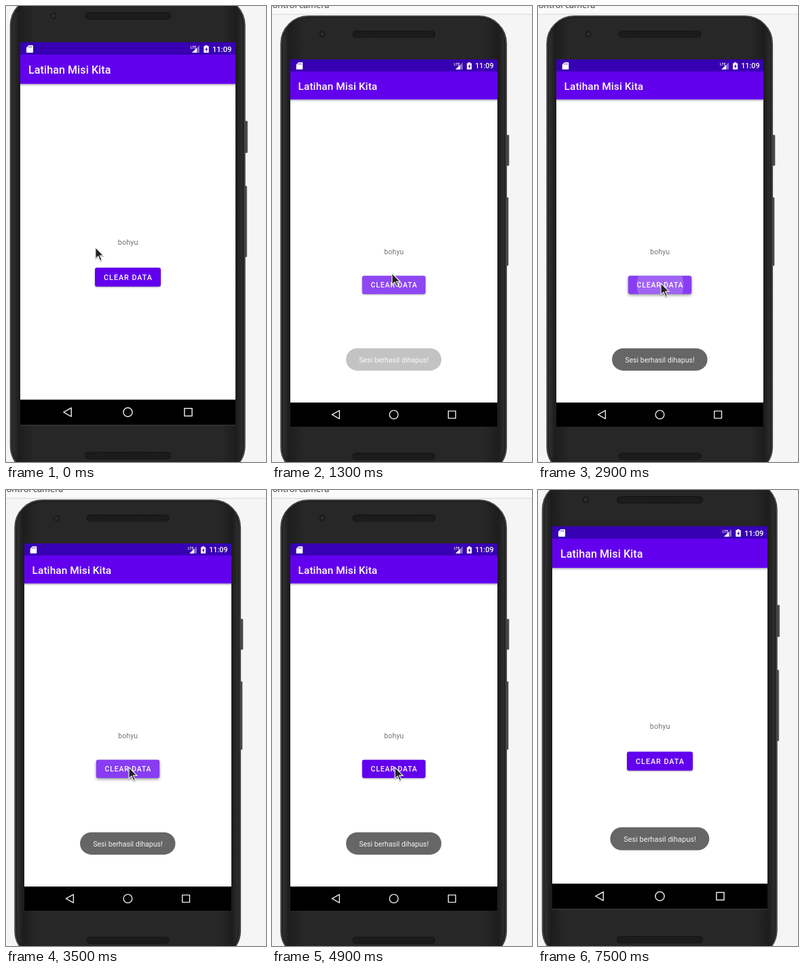
Write an HTML page that moves like this. It is 383 px wide and 674 px high and loops after 7.7 s.

```html
<!DOCTYPE html>
<html lang="id">
<head>
<meta charset="utf-8">
<title>Clear data</title>
<style>
  html, body { margin: 0; width: 100%; height: 100%; overflow: hidden; background: #f5f5f5; }
  svg { display: block; width: 383px; height: 674px; }
  text { font-family: Roboto, "Noto Sans", sans-serif; fill: #fff; }
  .medium { font-weight: 500; }
</style>
</head>
<body>
<svg viewBox="0 0 383 674">
  <defs>
    <linearGradient id="body">
      <stop offset="0" stop-color="#383838"/>
      <stop offset=".035" stop-color="#1d1d1d"/>
      <stop offset=".1" stop-color="#272727"/>
      <stop offset=".9" stop-color="#272727"/>
      <stop offset=".965" stop-color="#1d1d1d"/>
      <stop offset="1" stop-color="#343434"/>
    </linearGradient>
    <linearGradient id="barShadow" x2="0" y2="1">
      <stop offset="0" stop-color="#000" stop-opacity=".28"/>
      <stop offset="1" stop-color="#000" stop-opacity="0"/>
    </linearGradient>
    <clipPath id="buttonClip"><rect x="131" y="386.7" width="97" height="28" rx="3"/></clipPath>
    <g id="speaker">
      <rect x="116" y="-5.5" width="127" height="11" rx="5.5" fill="#161616"/>
      <g stroke="#353535" stroke-width="1.4" stroke-linecap="round" stroke-dasharray="0 3">
        <path d="M121 -2.8H240"/><path d="M119.5 0H241"/><path d="M121 2.8H240"/>
      </g>
    </g>
  </defs>

  <g id="view">
    <rect x="-20" y="-60" width="440" height="44" fill="#fafafa"/>
    <path d="M-20 -16H420" stroke="#d6d6d6"/>
    <text x="80.5" y="-25.6" font-size="13.3" text-anchor="end" style="fill:#333;font-family:'Open Sans',sans-serif">Control camera</text>

    <g fill="#484848" stroke="#666" stroke-width=".5">
      <rect x="350" y="170" width="5.8" height="47" rx="1"/>
      <rect x="350" y="266" width="4.8" height="105" rx="1"/>
    </g>
    <rect x="6.6" y="-13.2" width="345.2" height="705.4" rx="42" fill="url(#body)" stroke="#454545" stroke-width="1.8"/>
    <rect x="9" y="-10.8" width="340.4" height="700.6" rx="39.6" fill="none" stroke="#191919"/>
    <circle cx="70" cy="14.5" r="5" fill="#1c1c1c"/>
    <circle cx="70" cy="14.5" r="2.4" fill="#303030"/>
    <use href="#speaker" y="14.5"/>
    <use href="#speaker" y="664.5"/>

    <rect x="21" y="72" width="317" height="547.2" fill="#fff"/>
    <rect x="21" y="115.2" width="317" height="3.8" fill="url(#barShadow)"/>
    <rect x="21" y="53.5" width="317" height="19" fill="#3700b3"/>
    <rect x="21" y="72" width="317" height="43.2" fill="#6200ee"/>

    <path d="M33.5 58H39q1 0 1 1v9q0 1-1 1h-8q-1 0-1-1v-6.5z" fill="#fff"/>
    <path d="M33.8 59.5v2M35.7 59.5v2M37.6 59.5v2" stroke="#3700b3" stroke-width=".8"/>
    <text class="medium" x="271.5" y="63" font-size="5.6">LTE</text>
    <path d="M285 58V69H274z" fill="#fff" opacity=".4"/>
    <path d="M281 62V69H274z" fill="#fff"/>
    <path d="M293.5 58h3v1.2h2.2V69h-7.4V59.2h2.2z" fill="#fff"/>
    <path d="M295.7 60.5l-2.4 4.2h1.5v3l2.4-4.2h-1.5z" fill="#3700b3"/>
    <text class="medium" x="304" y="67.6" font-size="11.2">11:09</text>
    <text class="medium" x="33" y="100.3" font-size="16" letter-spacing=".1">Latihan Misi Kita</text>

    <text x="179.7" y="353.2" font-size="10.8" letter-spacing=".15" text-anchor="middle" style="fill:#757575">bohyu</text>

    <rect id="button" x="131" y="386.7" width="97" height="28" rx="3" fill="#6200ee"/>
    <g id="ripples" clip-path="url(#buttonClip)" fill="#fff"></g>
    <text class="medium" x="180" y="405" font-size="10.8" letter-spacing=".96" text-anchor="middle">CLEAR DATA</text>

    <g id="toast">
      <rect x="106.3" y="498.4" width="146" height="34.2" rx="17.1" fill="#666"/>
      <text x="179.5" y="519.8" font-size="11" text-anchor="middle" style="fill:#f2f2f2">Sesi berhasil dihapus!</text>
    </g>

    <rect x="21" y="581.8" width="317" height="37.4" fill="#000"/>
    <g fill="none" stroke="#e4e4e4" stroke-width="1.5" stroke-linejoin="round">
      <path d="M84.8 600.4L96.2 594V606.8z"/>
      <circle cx="179.5" cy="600.4" r="6.6"/>
      <rect x="262.9" y="594.8" width="11.2" height="11.2"/>
    </g>
  </g>

  <path id="cursor" d="M0 0V16.8L4 13.2L6.8 19.7L9.4 18.6L6.7 12.3H12z" fill="#222" stroke="#fff" stroke-width="1.1"
    style="filter:drop-shadow(.5px 1px .7px rgba(0,0,0,.35))"/>
</svg>

<script>
const LOOP = 7700, STEP = 100;
const ZOOM_OUT = 1100, ZOOM_IN = 7500, CURSOR_GONE = 6500;

// Ripples: start, end, radius growth per 100 ms, strength of the button tint
const ripples = [
  [1100, 1480, 31, .24],
  [1900, 2400, 23, .2],
  [2000, 2400, 16, 0],
  [2700, 3400, 17.5, .24],
  [3500, 4200, 17.5, .24],
  [4300, 4900, 17.5, .24]
].map(([from, end, grow, tint]) => ({ from, end, grow, tint }));

// Cursor stops: time, x, y
const stops = [
  [300, 131.8, 356.8], [900, 176.8, 395], [1400, 176.8, 395],
  [1800, 181, 409.8], [6000, 181, 409.8], [6400, 24.5, 1]
];

const $ = id => document.getElementById(id);
const clamp = v => Math.max(0, Math.min(1, v));
const set = (el, attrs) => {
  for (const name in attrs) el.setAttribute(name, attrs[name]);
  return el;
};
const add = (parent, tag, attrs) =>
  parent.appendChild(set(document.createElementNS(parent.namespaceURI, tag), attrs));

for (const r of ripples) {
  r.group = add($('ripples'), 'g', {});
  add(r.group, 'rect', { x: 131, y: 386, width: 97, height: 29, opacity: r.tint });
  r.circle = add(r.group, 'circle', { cx: 180, cy: 400.5, opacity: .2 });
}

function cursorAt(t) {
  let [, x, y] = stops[0];
  for (let i = 1; i < stops.length; i++) {
    const [t0, x0, y0] = stops[i - 1], [t1, x1, y1] = stops[i];
    if (t < t0) break;
    const p = clamp((t - t0) / (t1 - t0));
    x = x0 + (x1 - x0) * p;
    y = y0 + (y1 - y0) * p;
  }
  return [x, y];
}

function draw(t) {
  const small = t >= ZOOM_OUT && t < ZOOM_IN;
  set($('view'), { transform: small ? 'matrix(.962 0 0 .96 6.8 27.6)' : '' });

  let lifted = false;
  for (const r of ripples) {
    const on = t >= r.from && t < r.end;
    set(r.group, { opacity: on ? clamp((r.end - t) / 250) : 0 });
    set(r.circle, { r: on ? (t - r.from) / 100 * r.grow + 1 : 0 });
    if (on && t <= r.end - 300) lifted = true;
  }
  $('button').style.filter = lifted
    ? 'drop-shadow(0 2.5px 2px rgba(0,0,0,.4))'
    : 'drop-shadow(0 1px 1px rgba(0,0,0,.32))';

  set($('toast'), { opacity: clamp((t - 1200) / 260) });
  set($('cursor'), {
    transform: `translate(${cursorAt(t)})`,
    visibility: t < CURSOR_GONE ? 'visible' : 'hidden'
  });
}

function tick() {
  draw(Math.floor(performance.now() % LOOP / STEP) * STEP);
  requestAnimationFrame(tick);
}
tick();
</script>
</body>
</html>
```
